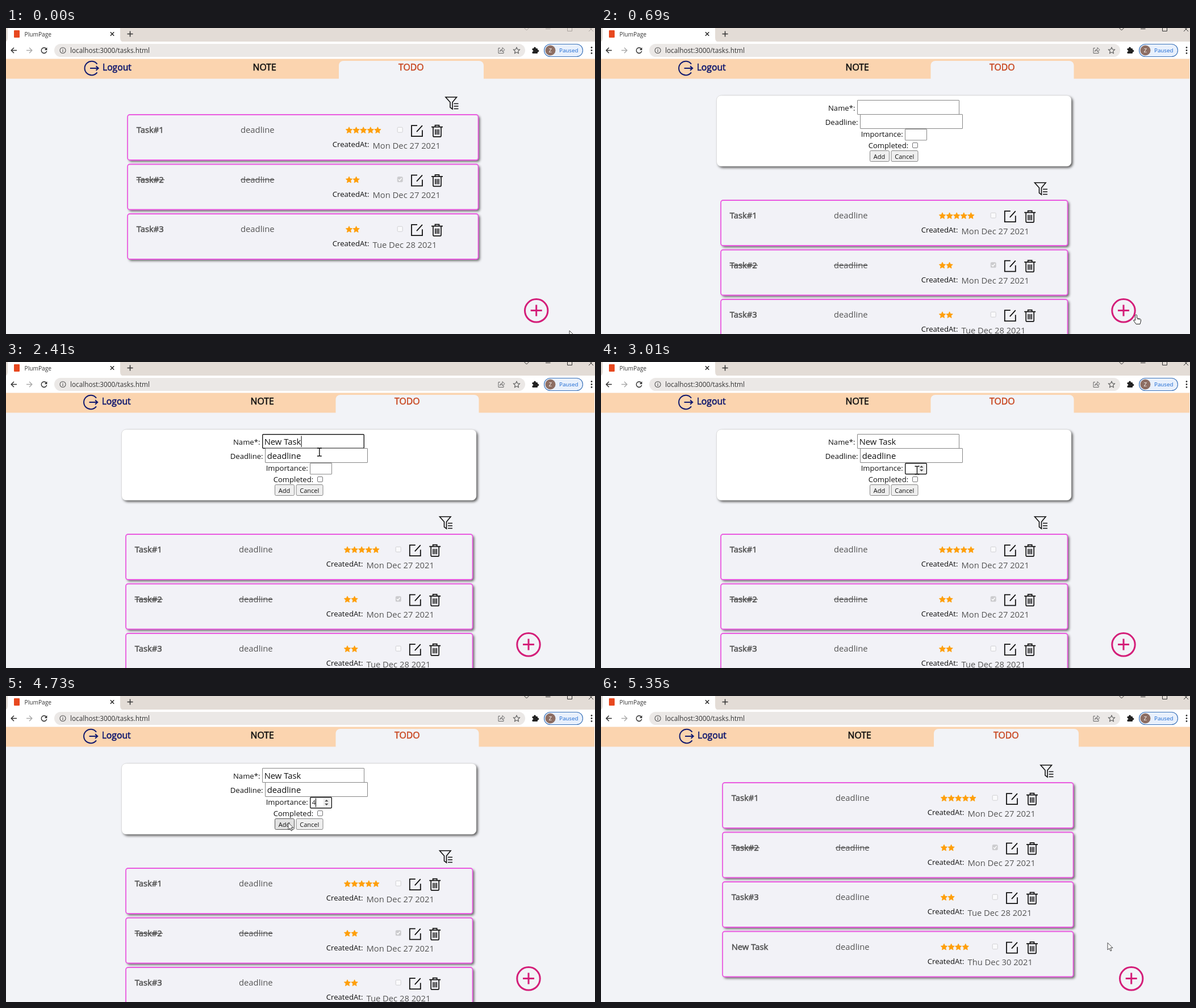
Write an HTML page with a canvas that moves like this. It is 1037 px wide and 540 px high and loops after 5.45 s.

```html
<!DOCTYPE html>
<html lang="en">
<head>
<meta charset="utf-8">
<title>Todo list</title>
<style>
html, body { margin: 0; width: 100%; height: 100%; overflow: hidden; background: #f2f3f7; }
canvas { display: block; }
</style>
</head>
<body>
<canvas id="stage" width="1037" height="540"></canvas>
<script>
const c = document.getElementById('stage').getContext('2d');
const LOOP = 5450, PAGE = '#f2f3f7', INK = '#111', FORM_HEIGHT = 151, PITCH = 87.5;

// ---- drawing helpers ----
function text(s, x, y, size, color = INK, bold = false) {
  c.font = size + 'px "Open Sans", "Noto Sans", sans-serif';
  c.fillStyle = color;
  c.fillText(s, x, y);
  if (bold) {
    c.strokeStyle = color;
    c.lineWidth = 0.6;
    c.strokeText(s, x, y);
  }
}

function box(x, y, w, h, r, fill, stroke, lw = 1) {
  c.beginPath();
  c.roundRect(x, y, w, h, r);
  if (fill) { c.fillStyle = fill; c.fill(); }
  if (stroke) { c.strokeStyle = stroke; c.lineWidth = lw; c.stroke(); }
}

function shape(d, x, y, stroke, lw = 1, fill) {
  const p = new Path2D(d);
  c.save();
  c.translate(x, y);
  if (fill) { c.fillStyle = fill; c.fill(p); }
  if (stroke) { c.strokeStyle = stroke; c.lineWidth = lw; c.stroke(p); }
  c.restore();
}

function disc(x, y, r, fill, stroke, lw) {
  box(x - r, y - r, 2 * r, 2 * r, r, fill, stroke, lw);
}

function star(x, y, r, fill, stroke) {
  c.beginPath();
  for (let i = 0; i < 10; i++) {
    const a = i * Math.PI / 5 - Math.PI / 2, q = i % 2 ? r * 0.48 : r;
    c.lineTo(x + q * Math.cos(a), y + q * Math.sin(a));
  }
  c.closePath();
  if (fill) { c.fillStyle = fill; c.fill(); }
  c.strokeStyle = stroke || fill;
  c.lineWidth = stroke ? 1.1 : 0.8;
  c.stroke();
}

function shadowed(draw) {
  c.save();
  c.shadowColor = '#5c5c5c';
  c.shadowBlur = 4;
  c.shadowOffsetX = c.shadowOffsetY = 2.7;
  draw();
  c.restore();
}

// ---- browser window ----
function browser(active) {
  c.fillStyle = '#e3dcd6';
  c.fillRect(0, 0, 1037, 25);
  c.fillStyle = '#fff';
  c.fillRect(0, 24, 1037, 31);
  shape('M-4 25Q3 25 3 17V0H201V17Q201 25 208 25Z', 0, 0, null, 1, '#fff');
  box(14, 4, 10, 13, 1, '#e8481f');
  text('PlumPage', 32.5, 15, 10.2, '#333');
  shape('M-3.2 -3.2L3.2 3.2M3.2 -3.2L-3.2 3.2', 187, 10.5, '#222', 1.4);
  shape('M-5 0H5M0 -5V5', 218.5, 10.5, '#333', 1.5);

  const tone = active ? '#333' : '#aaa39e';
  shape('M912.5 0L916.5 4L920.5 0M950 1.5H958.5M988.5 -3V5.5H996.5V-3M1026 6L1033 -1M1034 6L1027 -1', 0, 0, tone, 1);

  shape('M5 0H-4.5M0 -4.8L-4.8 0L0 4.8', 14, 39.5, '#333', 1.5);
  shape('M-5 0H4.5M0 -4.8L4.8 0L0 4.8', 41, 39.5, '#aaa', 1.4);
  shape('M3.8 -2.8A4.8 4.8 0 1 0 4.7 1.2', 67, 39.5, '#333', 1.5);
  shape('M5.4 -5.3V-.6H.7Z', 67, 39.5, null, 1, '#333');

  box(85, 28, 829, 23, 11.5, '#ebe8e6');
  disc(100, 39.5, 5, null, '#555', 1.1);
  shape('M0 -.8V3M0 -3V-1.8', 100, 39.5, '#555', 1.2);
  text('localhost:3000/tasks.html', 113, 43.7, 11.75, '#333');
  shape('M-2 -4H-5V5H4V2M-2.5 2Q-2 -2 2 -2V-5L6 -1L2 2.5V0Q-1 0 -2.5 2Z', 872, 39.5, '#666', 1);
  star(899, 40, 5.8, null, '#555');
  box(926.5, 36, 9.5, 9, 1, '#222');
  disc(931, 35.5, 1.9, '#222');
  disc(936.4, 40.5, 1.9, '#222');
  disc(926.8, 40.5, 1.4, '#fff');
  box(947.5, 28.5, 68, 22, 11, '#e8f0fc', '#3971b8', 1.1);
  disc(958.5, 39.5, 9, '#8d6e63');
  text('Z', 955.5, 43, 9.8, '#fff');
  text('Paused', 974, 43.4, 9.8, '#1967d2');
  for (const y of [34.5, 39.5, 44.5]) disc(1031, y, 1.4, '#333');
}

// ---- page; `open` means the form is visible and the layout is narrower ----
function header(open) {
  const k = open ? 1 : 0, navy = '#10196f';
  c.fillStyle = PAGE;
  c.fillRect(0, 54.5, 1037, 486);
  c.fillStyle = '#fbd4af';
  c.fillRect(0, 54.5, 1037, 35);
  box(586 - 5.5 * k, 58, 255 - 3 * k, 32, [8, 8, 0, 0], PAGE);
  if (open) {
    c.fillStyle = '#f8f8f8';
    c.fillRect(1036, 54.5, 1, 486);
  }
  const x = 150 - 1.5 * k;
  shape('M10.5 -7.3A12.2 12.2 0 1 0 10.5 7.3M-2 0H12.5M8.5 -3.8L12.7 0L8.5 3.8', x, 71, navy, 2);
  text('Logout', 170 - 1.3 * k, 75.3, 15.7, navy, true);
  text('NOTE', 434.5 - 4 * k, 75.3, 15.8, INK, true);
  text('TODO', 691 - 7 * k, 75.3, 15.8, '#c94a24', true);
}

function checkbox(x, y, color, checked) {
  box(x + 0.5, y + 0.5, 9, 9, 1.5, checked ? '#cbcbce' : '#fafafc', color);
  if (checked) shape('M2.3 5L4.3 7.2L7.8 2.8', x, y, '#fff', 1.5);
}

function card(i, open, name, stars, date, done) {
  const k = open ? 1 : 0, grey = '#555';
  const left = 214 - 3 * k, width = 617.5 - 7 * k;
  c.save();
  c.translate(0, i * PITCH + FORM_HEIGHT * k);
  shadowed(() => box(left, 153, width, 80, 4, PAGE));
  box(left, 153, width, 80, 4, '#f2f2f7', '#ea5be0', 1.8);
  text(name, 229.7 - 3 * k, 185, 14.8, grey, true);
  text('deadline', 413 - 3 * k, 185, 14.8, grey);
  if (done) {
    c.fillStyle = grey;
    c.fillRect(229.5 - 3 * k, 179.6, 49.5, 1.3);
    c.fillRect(413 - 3 * k, 179.6, 59.5, 1.1);
  }
  for (let n = 0; n < stars; n++) star(604 - 3 * k + n * 12.6, 180.7, 6, '#ff9f0a');
  checkbox(688.7 - 3 * k, 174.7, '#d0d0d3', done);
  shape('M11 1H1V20H20V9M10 12L20 1', 713 - 3.2 * k, 171.2, INK, 1.8);
  shape('M0 4H20M6.5 4V1H13.5V4M3 4V19.5Q3 21.2 5 21.2H15Q17 21.2 17 19.5V4M7 8V17.5M10 8V17.5M13 8V17.5',
    749 - 3.8 * k, 170.7, INK, 1.7);
  text('CreatedAt:', 574.7 - 11 * k, 210.4, 13.2);
  text(date, 645.5 - 11 * k, 212.8, 14.75, grey);
  c.restore();
}

function list(open, added) {
  const k = open ? 1 : 0;
  shape('M1 1H20.5L13 10V22.2L9 19V10ZM15.5 12.5H23.5M15.5 17H23.5M15.5 21.5H23.5',
    773 - 10.5 * k, 121 + FORM_HEIGHT * k, INK, 1.6);
  card(0, open, 'Task#1', 5, 'Mon Dec 27 2021');
  card(1, open, 'Task#2', 2, 'Mon Dec 27 2021', true);
  card(2, open, 'Task#3', 2, 'Tue Dec 28 2021');
  if (added) card(3, open, 'New Task', 4, 'Thu Dec 30 2021');
  const x = 933.7 - 13.7 * k;
  disc(x, 498.8, 20.2, null, '#d41e79', 3);
  shape('M-10 0H10M0 -10V10', x, 498.5, '#d41e79', 3);
}

function field(x, y, w, h, focus) {
  if (focus) box(x + 0.7, y + 0.7, w - 1.4, h - 1.4, 1.5, '#fff', '#1a1a1a', 1.4);
  else box(x + 0.5, y + 0.5, w - 1, h - 1, 0.5, '#fff', '#858585');
}

function caret(x, y, h) {
  c.fillStyle = '#000';
  c.fillRect(x, y, 1, h);
}

function button(s, x, w, hover) {
  box(x + 0.5, 216.5, w - 1, 19, 2, hover ? '#e2e2e2' : '#efefef', hover ? '#555' : '#858585');
  text(s, x + 6.7, 230.5, 11);
}

function form(t, cursor) {
  shadowed(() => box(203.5, 119, 624.5, 125, 8, '#fff'));
  box(203.5, 119, 624.5, 125, 8, '#fff', '#ccc', 0.6);
  const over = (x, w) => cursor.y > 216 && cursor.y < 236 && cursor.x > x && cursor.x < x + w;
  const onName = t >= 1510 && t < 2510, onStars = t >= 2510;

  text('Name*:', 400, 146, 13.1);
  field(451, 127, 180, 26, onName);
  const typed = t < 2110 ? '' : t < 2410 ? 'N' : 'New Task';
  text(typed, 454.7, 146, 14.8);
  if (onName && !(t >= 2010 && t < 2110)) caret(455 + c.measureText(typed).width, 130.5, 19.5);

  text('Deadline:', 394.7, 171, 13.15);
  field(456, 152, 181, 26);
  if (t >= 2410) text('deadline', 459.7, 171, 14.8);

  text('Importance:', 457.7, 192, 13.1);
  field(535, 178, 39, 20.5, onStars);
  if (onStars) {
    box(558.5, 180.5, 12, 15.5, 0, '#efefef');
    shape('M-3.2 -1.8L0 -5L3.2 -1.8ZM-3.2 1.8L0 5L3.2 1.8Z', 564.3, 188, null, 1, '#444');
    const four = t >= 3610;
    if (four) text('4', 538.8, 192, 11);
    const off = t >= 3010 && t < 3510 || t >= 4030 && t < 4530;
    if (!off) caret(four ? 545 : 539, 180.5, 15.5);
  }

  text('Completed:', 470.7, 212.3, 13.1);
  checkbox(548, 202, '#767676');
  button('Add', 473, 35, over(473, 35));
  button('Cancel', 510.5, 48, over(510.5, 48));
}

// ---- pointer: [start, end, steps, x, y, kind] ----
const MOVES = [
  [100, 590, 6, 941, 507, 'arrow'],
  [690, 690, 1, 942, 506, 'hand'],
  [790, 1190, 5, 565, 166, 'arrow'],
  [1290, 1390, 2, 549, 143, 'beam'],
  [2410, 2610, 3, 556, 191, 'beam'],
  [3610, 3910, 4, 553, 205, 'arrow'],
  [4330, 4630, 4, 497, 223.5, 'arrow'],
  [4930, 5350, 5, 892, 435.5, 'arrow']
];

function pointer(t) {
  let x = 992, y = 534, kind = 'arrow';
  for (const [start, end, steps, tx, ty, next] of MOVES) {
    if (t < start) break;
    const gap = (end - start) / (steps - 1) || 1;
    const f = Math.min(steps, Math.floor((t - start) / gap + 0.02) + 1) / steps;
    x += (tx - x) * f;
    y += (ty - y) * f;
    kind = next;
  }
  return { x, y, kind };
}

function drawPointer({ x, y, kind }) {
  if (kind === 'beam') {
    shape('M-4 -7H-1L0 -6L1 -7H4M0 -6V6M-4 7H-1L0 6L1 7H4', x + 0.5, y, '#111', 1.4);
  } else if (kind === 'hand') {
    shape('M-1.5 1Q0 -2 1.5 1V6L7.5 7.5Q9 8 8.5 11L7 16.5H0L-4.5 10Q-4 8 -1.5 10Z', x, y, '#222', 1, '#fff');
    shape('M3.5 6.5V9M6 7V9.5', x, y, '#222', 0.8);
  } else {
    shape('M0 0V12.5L3 9.8L5 14.5L7 13.6L5 9H9Z', x, y, '#333', 0.9, '#fff');
  }
}

function draw(t) {
  const open = t >= 690 && t < 4830, cursor = pointer(t);
  browser(t >= 690);
  header(open);
  if (open) form(t, cursor);
  list(open, t >= 4930);
  drawPointer(cursor);
}

const began = performance.now();
function tick() {
  draw((performance.now() - began) % LOOP);
  requestAnimationFrame(tick);
}
tick();
</script>
</body>
</html>
```
